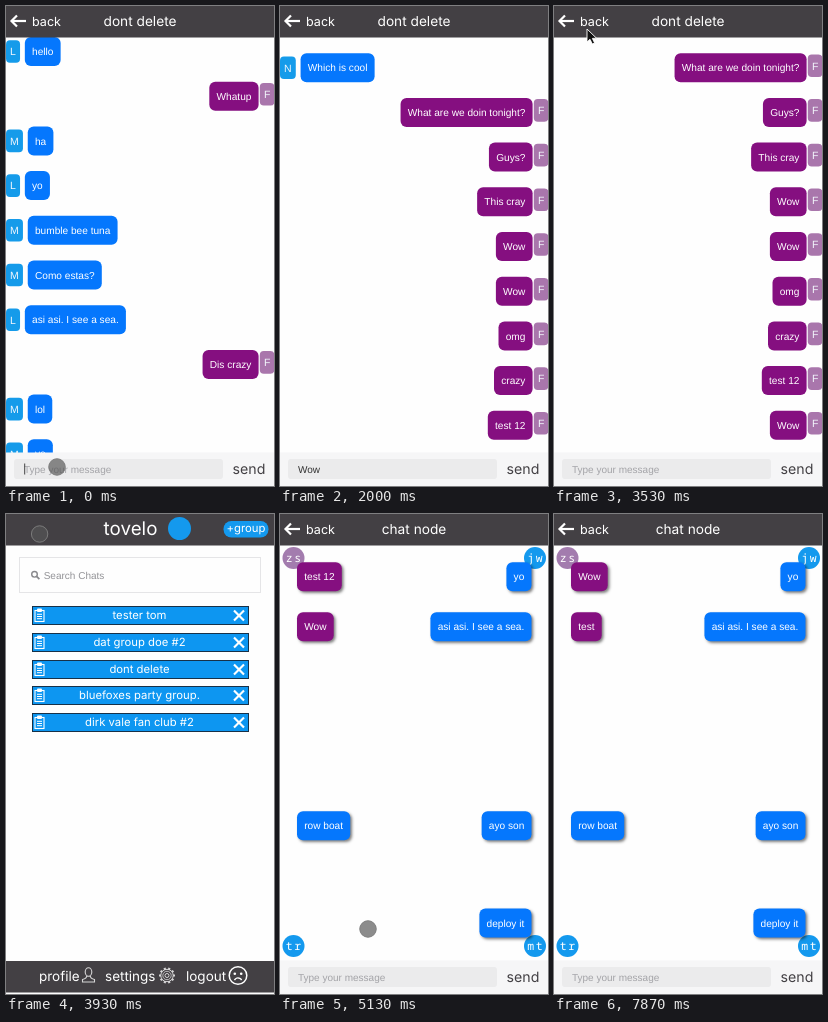
Animation of 268 by 480 pixels, one loop 8 s. Source, as an HTML page with a canvas:

```html
<!DOCTYPE html>
<html lang="en">
<head>
<meta charset="utf-8">
<title>Group chat</title>
<style>
html, body { margin: 0; width: 100%; height: 100%; overflow: hidden; background: #fefefe; }
canvas { display: block; width: 268px; height: 480px; }
</style>
</head>
<body>
<canvas id="stage"></canvas>
<script>
const W = 268, H = 480, LOOP = 8000;
const canvas = document.getElementById('stage');
const ratio = window.devicePixelRatio || 1;
canvas.width = W * ratio;
canvas.height = H * ratio;
const c = canvas.getContext('2d');
c.scale(ratio, ratio);
c.textRendering = 'geometricPrecision';

const SANS = '"Liberation Sans", Arial, sans-serif';
const TITLE = 'Inter, "Open Sans", sans-serif';
const MONO = '"Noto Sans Mono", "DejaVu Sans Mono", monospace';
const DARK = '#434044', BLUE = '#0577fd', SKY = '#1499ee', PURPLE = '#850f80', MAUVE = '#a976ac';
const ROW = 44.7, FIRST = 45.5, BAR = 31.5;
const SIZE = 10.15, PAD = 7.2;
const LIST_AT = 3750, NODE_AT = 4750;
const SEND_1 = 2600, SEND_2 = 7200;

const messages = [
  ['L', 'hello'], ['F', 'Whatup'], ['M', 'ha'], ['L', 'yo'], ['M', 'bumble bee tuna'],
  ['M', 'Como estas?'], ['L', 'asi asi. I see a sea.'], ['F', 'Dis crazy'], ['M', 'lol'],
  ['M', 'yo'], ['N', 'Which is cool'], ['F', 'What are we doin tonight?'], ['F', 'Guys?'],
  ['F', 'This cray'], ['F', 'Wow'], ['F', 'Wow'], ['F', 'omg'], ['F', 'crazy'],
  ['F', 'test 12'], ['F', 'Wow']
];
const groups = ['tester tom', 'dat group doe #2', 'dont delete',
  'bluefoxes party group.', 'dirk vale fan club #2'];

// Pointer stops: time, x, y, shape
const stops = [
  [0, 51, 461, 'dot'], [1000, 51, 461, ''], [3000, 51, 440, 'arrow'], [3450, 33, 23, 'arrow'],
  [3620, 33, 23, 'dot'], [3900, 33, 20, 'dot'], [4500, 126, 20, 'dot'], [NODE_AT, 126, 20, 'dot'],
  [5100, 88, 415, 'dot'], [5270, 88, 415, 'dot'], [5750, 48, 461, 'dot'], [6600, 48, 461, ''],
  [LOOP, 48, 461, '']
];

const clamp = v => Math.max(0, Math.min(1, v));
const ease = v => (1 - Math.cos(Math.PI * clamp(v))) / 2;

function text(s, x, y, size, color = '#fff', align = 'left', family = SANS) {
  c.font = `400 ${size}px ${family}`;
  c.fillStyle = color;
  c.textAlign = align;
  c.fillText(s, x, y);
}
function title(s, x, y, size = 13.5, align = 'left', color = '#fff') {
  text(s, x, y, size, color, align, TITLE);
}
function box(x, y, w, h, r, color) {
  c.fillStyle = color;
  c.beginPath();
  c.roundRect(x, y, w, h, r);
  c.fill();
}
function frame(x, y, w, h, width, color) {
  c.strokeStyle = color;
  c.lineWidth = width;
  c.strokeRect(x, y, w, h);
}
function disc(x, y, r, color) {
  c.fillStyle = color;
  c.beginPath();
  c.arc(x, y, r, 0, 7);
  c.fill();
}
function line(points, width, color = '#fff') {
  c.strokeStyle = color;
  c.lineWidth = width;
  c.beginPath();
  points.forEach(([x, y], i) => i ? c.lineTo(x, y) : c.moveTo(x, y));
  c.stroke();
}
function ring(x, y, r, width, color = '#fff', from = 0, to = Math.PI * 2) {
  c.strokeStyle = color;
  c.lineWidth = width;
  c.beginPath();
  c.arc(x, y, r, from, to);
  c.stroke();
}
function measure(s, size) {
  c.font = `400 ${size}px ${SANS}`;
  return c.measureText(s).width;
}

function bubble(s, x, y, color, right, shadow) {
  const w = measure(s, SIZE) + 2 * PAD;
  const left = right ? x - w : x;
  c.save();
  if (shadow) {
    c.shadowColor = 'rgba(0,0,0,.5)';
    c.shadowBlur = 3 * ratio;
    c.shadowOffsetX = c.shadowOffsetY = 1.8 * ratio;
  }
  box(left, y - 14.5, w, 29, 6, color);
  c.restore();
  text(s, left + PAD, y + 3.6, SIZE);
}

function message([who, s], y) {
  const mine = who === 'F';
  const w = measure(who, 10.5) + 8.2;
  const x = mine ? W - w + .4 : 0;
  const mid = mine ? y - 2 : y;
  box(x, mid - 11.3, w, 22.6, 4, mine ? MAUVE : '#159bea');
  text(who, x + w / 2, mid + 3.8, 10.5, '#f2f6fc', 'center');
  bubble(s, mine ? 252.6 : w + 4.8, y, mine ? PURPLE : BLUE, mine);
}

function header(s) {
  box(0, 0, W, BAR, 0, DARK);
  if (!s) return;
  line([[20, 15], [6, 15]], 2.2);
  line([[11, 9.5], [5.5, 15], [11, 20.5]], 2.2);
  title('back', 26, 19.5, 12.6);
  title(s, 134, 19.5, 13.7, 'center');
}

function inputBar(typed, caret) {
  box(0, 446.5, W, 33.5, 0, '#f6f6f7');
  box(8, 453, 209, 20, 3, '#ebebec');
  text(typed || 'Type your message', 18, 466.6, 10, typed ? '#333' : '#a4a4a8');
  if (caret) {
    const x = 18.7 + (typed ? measure(typed, 10) : 0);
    line([[x, 457.5], [x, 468.5]], 1, '#444');
  }
  title('send', 243, 467.5, 14.2, 'center', '#434044');
}

function typing(s, t, start, step, end) {
  if (t < start || t >= end) return '';
  return s.slice(0, 1 + Math.floor((t - start) / step));
}

function chat(t) {
  const sent = t >= SEND_1;
  const scroll = 430.8 * ease((t - 50) / 370) + ROW * ease((t - SEND_1) / 400);
  messages.forEach((m, i) => {
    const y = FIRST + i * ROW - scroll;
    if (y < 17.3 || y > 470 || (i === messages.length - 1 && !sent)) return;
    message(m, y);
  });
  header('dont delete');
  inputBar(typing('Wow', t, 1100, 260, SEND_1), t < 1900);
}

function clipboard(x, y) {
  frame(x - 4.5, y - 5, 9, 11, 1.1, '#fff');
  box(x - 2.5, y - 7, 5, 3.5, 1, '#fff');
  for (const d of [-1.2, 1, 3.2]) line([[x - 2.5, y + d], [x + 2.5, y + d]], 1);
}

function person(x, y) {
  c.strokeStyle = '#d6d5d6';
  c.lineWidth = 1.1;
  c.beginPath();
  c.ellipse(x, y - 3, 3.3, 4.2, 0, 0, 7);
  c.moveTo(x - 1.8, y + 1);
  c.quadraticCurveTo(x - 1.8, y + 3.5, x - 6, y + 4.5);
  c.lineTo(x - 6, y + 7);
  c.lineTo(x + 6, y + 7);
  c.lineTo(x + 6, y + 4.5);
  c.quadraticCurveTo(x + 1.8, y + 3.5, x + 1.8, y + 1);
  c.stroke();
}

function gear(x, y) {
  const color = '#d6d5d6';
  ring(x, y, 6.2, 1, color);
  ring(x, y, 4.2, .8, color);
  ring(x, y, 2, 1, color);
  for (let a = 0; a < 10; a++) {
    const dx = Math.cos(a * Math.PI / 5), dy = Math.sin(a * Math.PI / 5);
    line([[x + dx * 6, y + dy * 6], [x + dx * 8, y + dy * 8]], 2.2, color);
  }
}

function sadFace(x, y) {
  ring(x, y, 8.8, 1.5);
  disc(x - 3.2, y - 1.8, 1.3, '#fff');
  disc(x + 3.2, y - 1.8, 1.3, '#fff');
  ring(x, y + 6.5, 4, 1.4, '#fff', Math.PI * 1.15, Math.PI * 1.85);
}

function groupList() {
  header('');
  title('tovelo', 124.5, 20.5, 18.8, 'center');
  disc(173.5, 14.5, 11.5, SKY);
  box(217.5, 7, 45, 16.5, 8, SKY);
  title('+group', 240, 18, 11.3, 'center');

  frame(13.5, 43.5, 241, 35, 1, '#e5e5e7');
  ring(28.5, 60.3, 2.8, 1.4, '#88888c');
  line([[30.6, 62.4], [33.4, 65.2]], 1.7, '#88888c');
  text('Search Chats', 37.7, 65.3, 10, '#939397');

  groups.forEach((g, i) => {
    const top = Math.round(92 + i * 26.8), y = top + 9.5;
    box(26, top, 217, 19, 0, '#0d96f1');
    frame(26.5, top + .5, 216, 18, 1, '#173148');
    clipboard(33.5, y);
    title(g, 133.5, y + 3.8, 11.3, 'center');
    line([[228, y - 5], [238, y + 5]], 2.2);
    line([[238, y - 5], [228, y + 5]], 2.2);
  });

  box(0, 447, W, BAR, 0, DARK);
  title('profile', 33, 467);
  person(82.5, 461);
  title('settings', 99, 467);
  gear(161, 461.5);
  title('logout', 180, 467);
  sadFace(232, 461.5);
}

function node(t) {
  const done = t >= SEND_2;
  const avatars = [['zs', 13.5, 44, '#a37cae'], ['jw', 255, 44, SKY],
    ['tr', 13.5, 432, SKY], ['mt', 255, 432, SKY]];
  for (const [s, x, y, color] of avatars) {
    disc(x, y, 11, color);
    [...s].forEach((letter, i) =>
      text(letter, x - 4.2 + i * 8.4, y + 3.8, 11.5, '#fff', 'center', MONO));
  }
  const notes = [
    [done ? 'Wow' : 'test 12', 17, 62.7, PURPLE], [done ? 'test' : 'Wow', 17, 112.8, PURPLE],
    ['yo', 251.5, 62.7, BLUE, true], ['asi asi. I see a sea.', 251.5, 112.8, BLUE, true],
    ['row boat', 17, 311.8, BLUE], ['ayo son', 251.5, 311.8, BLUE, true],
    ['deploy it', 251.5, 409, BLUE, true]
  ];
  for (const [s, x, y, color, right] of notes) bubble(s, x, y, color, right, true);
  header('chat node');
  const caret = t >= 5800 && t < 7670 && !(t >= 6330 && t < 6600);
  inputBar(typing('test', t, 6600, 140, SEND_2), caret);
}

function pointer(t) {
  let i = 0;
  while (i < stops.length - 2 && t >= stops[i + 1][0]) i++;
  const [t0, x0, y0, shape] = stops[i], [t1, x1, y1] = stops[i + 1];
  if (!shape) return;
  const k = ease((t - t0) / (t1 - t0));
  const x = x0 + (x1 - x0) * k, y = y0 + (y1 - y0) * k;
  if (shape === 'dot') {
    disc(x, y, 8.5, 'rgba(85,85,85,.68)');
    ring(x, y, 8.2, 1, 'rgba(130,130,130,.85)');
    return;
  }
  c.beginPath();
  [[0, 0], [0, 13], [3, 10.3], [5.3, 15], [7.6, 14], [5.4, 9.4], [9.5, 9.2]]
    .forEach(([dx, dy]) => c.lineTo(x + dx, y + dy));
  c.closePath();
  c.fillStyle = '#111';
  c.fill();
  c.strokeStyle = '#fff';
  c.lineWidth = .9;
  c.stroke();
}

function draw(t) {
  c.fillStyle = '#fefefe';
  c.fillRect(0, 0, W, H);
  if (t < LIST_AT) chat(t);
  else if (t < NODE_AT) groupList();
  else node(t);
  pointer(t);
}

const begin = performance.now();
function tick() {
  draw((performance.now() - begin) % LOOP);
  requestAnimationFrame(tick);
}
tick();
</script>
</body>
</html>
```
